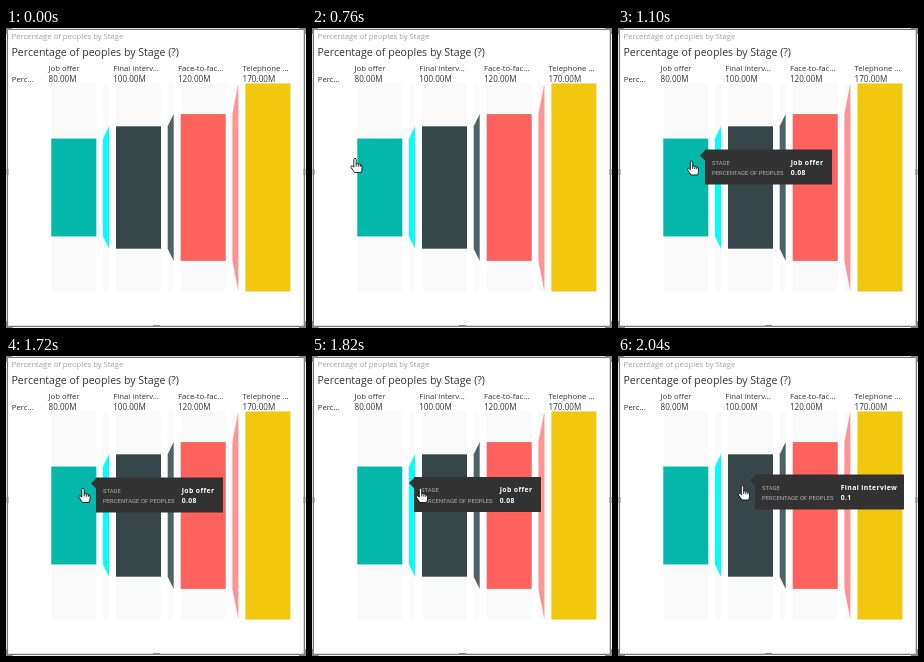
An HTML page for the animation above (3.17 s loop, 300 by 300 pixels).

```html
<!DOCTYPE html>
<html lang="en">
<head>
<meta charset="utf-8">
<title>Funnel by stage</title>
<style>
  html, body { margin: 0; width: 100%; height: 100%; overflow: hidden; background: #fff; }
  svg { display: block; width: 100vw; height: 100vh; }
  text { font-family: "Open Sans", "Noto Sans", sans-serif; fill: #333; white-space: pre; }
  .header { font-size: 7.7px; fill: #a0a0a0; }
  .title { font-size: 10.58px; }
  .label { font-size: 7.75px; }
  .value { font-size: 8.1px; }
  .tip-key { font: 5.9px Roboto, sans-serif; fill: #b4b4b4; }
  .tip-value { font-size: 6.8px; font-weight: 700; letter-spacing: .4px; fill: #fff; }
</style>
</head>
<body>
<svg viewBox="0 0 300 300">
  <rect width="300" height="300" fill="#fff"/>
  <g id="chart"></g>
  <rect x="1.4" y="1.4" width="297" height="297" fill="none" stroke="#777" stroke-width="1.3"/>
  <path d="M1.5 141v6M298.5 141v6M147 298h7M.8 293v6h6M293 299h6v-6M293 1h6v5M1 6v-5h5"
        fill="none" stroke="#858585" stroke-width="2"/>
  <text class="header" x="5.5" y="11">Percentage of peoples by Stage</text>
  <text class="title" x="5.5" y="28">Percentage of peoples by Stage (?)</text>
  <text class="label" x="5.8" y="53.5">Perc...</text>
  <g id="tooltip">
    <path id="tipBox" fill="#323232"/>
    <text class="tip-key" x="7" y="15.2">STAGE</text>
    <text class="tip-key" x="7" y="25.7">PERCENTAGE OF PEOPLES</text>
    <text class="tip-value" id="tipStage" x="85.7" y="15.2"></text>
    <text class="tip-value" id="tipShare" x="85.7" y="25.7"></text>
  </g>
  <path id="hand" fill="#fff" stroke="#111" stroke-width=".9" stroke-linejoin="round"
        d="M-1.2 .9Q-1.2 -.2 0 -.2Q1.2 -.2 1.2 .9V5Q3 4.4 3.3 5.6Q5 5 5.3 6.3Q7 6 7 8V10.5Q7 12 6 14H-.6Q-2 11.5 -4 9Q-4.6 7.5 -3.2 7.3Q-2.2 7.4 -1.2 8.7Z
           M1.2 5V8M3.3 5.6V8.2M5.3 6.3V8.4"/>
</svg>
<script>
const LOOP = 3170;
const SVG = "http://www.w3.org/2000/svg";
const chart = document.getElementById("chart");
const hand = document.getElementById("hand");
const tooltip = document.getElementById("tooltip");
const tipBox = document.getElementById("tipBox");
const tipStage = document.getElementById("tipStage");
const tipShare = document.getElementById("tipShare");

const stages = [
  { label: "Job offer", value: 80, color: "#01b8aa", link: "#00ffff" },
  { label: "Final interv...", value: 100, color: "#374649", link: "#4f6367" },
  { label: "Face-to-fac...", value: 120, color: "#fd625e", link: "#fe9593" },
  { label: "Telephone ...", value: 170, color: "#f2c80f" }
];

function add(tag, attrs, content = "") {
  const node = document.createElementNS(SVG, tag);
  for (const key in attrs) node.setAttribute(key, attrs[key]);
  node.textContent = content;
  chart.append(node);
}

const barHeight = value => value / 170 * 208;
const MIDDLE = 159.5;

stages.forEach(({ label, value, color, link }, i) => {
  const x = 45.3 + i * 64.7;
  const half = barHeight(value) / 2;
  add("rect", { x, y: 55.5, width: 45, height: 208, fill: "#fafafa" });
  add("rect", { x, y: MIDDLE - half, width: 45, height: half * 2, fill: color });
  add("text", { class: "label", x: x - 2.8, y: 43.3 }, label);
  add("text", { class: "value", x: x - 2.8, y: 53.5 }, value + ".00M");
  if (!link) return;
  const next = barHeight(stages[i + 1].value) / 2;
  const left = x + 51.7, right = x + 57.7;
  add("rect", { x: left, y: 55.5, width: 6, height: 208, fill: "#fafafa" });
  add("polygon", {
    points: [left, MIDDLE - half, right, MIDDLE - next, right, MIDDLE + next, left, MIDDLE + half].join(" "),
    fill: link
  });
});

// time, fingertip x, fingertip y
const pointerSteps = [
  [630, 6.5, 126.5], [660, 12, 127], [700, 26, 128.5], [740, 43, 130.5],
  [780, 58, 132], [820, 69, 133], [860, 73.5, 133],
  [1720, 77, 132.5], [1750, 84, 132.5], [1790, 96, 132.5], [1820, 108.5, 132.5],
  [1870, 115, 132], [1910, 119, 131.5], [1950, 122, 131], [2000, 123.7, 130.5], [2040, 124.5, 130]
];

// time, box x, box y, hovered stage
const tooltipSteps = [
  [1100, 87, 121.5, 0], [1720, 90, 121.5, 0], [1750, 97, 121.3, 0], [1790, 102, 121, 0],
  [1870, 128, 120, 1], [1910, 132, 119.5, 1], [1950, 135, 119, 1], [2000, 136.5, 118.5, 1], [2040, 137, 118.5, 1]
];

const tips = [
  { stage: "Job offer", share: "0.08", width: 127 },
  { stage: "Final interview", share: "0.1", width: 149 }
];

const stepAt = (steps, t) => steps.filter(step => step[0] <= t).pop();

function place(node, step) {
  node.style.display = step ? "" : "none";
  if (step) node.setAttribute("transform", `translate(${step[1]} ${step[2]})`);
}

function draw(t) {
  const tipStep = stepAt(tooltipSteps, t);
  place(hand, stepAt(pointerSteps, t));
  place(tooltip, tipStep);
  if (!tipStep) return;
  const { stage, share, width } = tips[tipStep[3]];
  tipBox.setAttribute("d", `M0 0H${width}V35H0V11L-5 6L0 1Z`);
  tipStage.textContent = stage;
  tipShare.textContent = share;
}

const start = performance.now();
function tick() {
  draw((performance.now() - start) % LOOP);
  requestAnimationFrame(tick);
}
tick();
</script>
</body>
</html>
```
